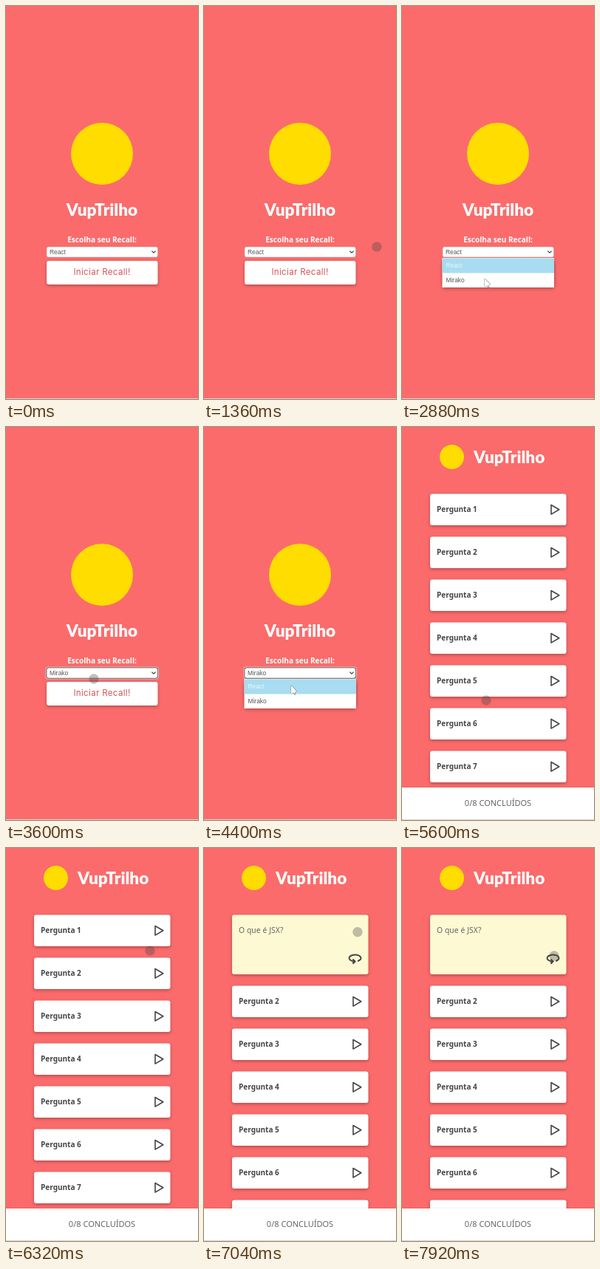
These frames come from a looping animation (260 by 532 pixels, 8000 ms). An HTML page with a canvas:

```html
<!DOCTYPE html>
<html lang="pt-BR">
<head>
<meta charset="utf-8">
<title>VupTrilho</title>
<style>
html, body { margin: 0; width: 100%; height: 100%; overflow: hidden; background: #fb6b6b; }
canvas { display: block; width: 260px; height: 532px; }
</style>
</head>
<body>
<canvas id="stage"></canvas>
<script>
const W = 260, H = 532, LOOP = 8000, STEP = 80;
const RED = '#fb6b6b', INK = '#444', YELLOW = '#ffdd00';
const SANS = '"Noto Sans", sans-serif';
const SMALL = '8.4px "Liberation Sans", sans-serif';
const TITLE = '900 22.6px Lato, sans-serif';
const OPTIONS = ['React', 'Mirako'];

// moments of the session, in ms
const TOUCH = 1360, OPEN = 2240, PICK = 3360, REOPEN = 4080, REPICK = 4640, BEGIN = 5600, FLIP = 6960;

// pointer glides: start, duration, destination
const glides = [
  { at: TOUCH, time: 560, x: 106, y: 357 },
  { at: 1920, time: 240, x: 112, y: 341 },
  { at: OPEN, time: 640, x: 112, y: 369 },
  { at: PICK, time: 240, x: 119, y: 341 },
  { at: REOPEN, time: 400, x: 118, y: 351 },
  { at: REPICK, time: 400, x: 114, y: 370 },
  { at: BEGIN, time: 720, x: 195, y: 139 },
  { at: 6480, time: 320, x: 208, y: 113 },
  { at: FLIP, time: 960, x: 206, y: 146 }
];

const canvas = document.getElementById('stage');
const ctx = canvas.getContext('2d');
const dpr = window.devicePixelRatio || 1;
canvas.width = W * dpr;
canvas.height = H * dpr;

const ease = k => k * k * (3 - 2 * k);
const within = (t, from, to) => t >= from && t < to;

function pointer(t) {
  let x = 234, y = 326;
  for (const g of glides) {
    const k = ease(Math.min(1, Math.max(0, (t - g.at) / g.time)));
    x += (g.x - x) * k;
    y += (g.y - y) * k;
  }
  return [x, y];
}

function text(str, x, y, font, color, align = 'left', spacing = 0) {
  ctx.font = font;
  ctx.fillStyle = color;
  ctx.textAlign = align;
  ctx.letterSpacing = spacing + 'px';
  ctx.fillText(str, x, y);
}

function box(x, y, w, h, r, fill, shadow = 0) {
  ctx.save();
  if (shadow) {
    ctx.shadowColor = 'rgba(0,0,0,.3)';
    ctx.shadowBlur = shadow * dpr;
    ctx.shadowOffsetY = 1.5 * dpr;
  }
  ctx.fillStyle = fill;
  ctx.beginPath();
  ctx.roundRect(x, y, w, h, r);
  ctx.fill();
  ctx.restore();
}

function dot(x, y, r, fill) {
  ctx.fillStyle = fill;
  ctx.beginPath();
  ctx.arc(x, y, r, 0, Math.PI * 2);
  ctx.fill();
}

function line(points, color, width, closed) {
  ctx.strokeStyle = color;
  ctx.lineWidth = width;
  ctx.lineJoin = ctx.lineCap = 'round';
  ctx.beginPath();
  points.forEach(p => ctx.lineTo(...p));
  if (closed) ctx.closePath();
  ctx.stroke();
}

function arrow(x, y) {
  line([[x + 3, y + 7], [x + 5, y + 11.5]], '#888', 2.4);
  line([[x, y], [x, y + 11], [x + 7.2, y + 8]], '#888', 1, true);
  ctx.fillStyle = '#fff';
  ctx.fill();
  line([[x + 3, y + 7], [x + 4.8, y + 11]], '#fff', 1);
}

function popup(hover) {
  box(54.5, 341, 151.5, 40, 0, '#fff', 5);
  ctx.fillStyle = '#a8dcf0';
  ctx.fillRect(54.5, 341.5 + hover * 20, 151.5, 20);
  OPTIONS.forEach((name, i) =>
    text(name, 59.5, 354.2 + i * 20, SMALL, i === hover ? '#e8f6fb' : '#555'));
}

function home(t, open) {
  dot(130, 200, 42, YELLOW);
  text('VupTrilho', 130, 284, TITLE, '#fff', 'center');
  text('Escolha seu Recall:', 130, 320.3, '600 10.1px ' + SANS, '#fff', 'center');

  const focus = t >= PICK;
  if (focus) box(53.5, 324.5, 153.5, 17, 4, '#e6c4c4');
  box(54.5, 325.5, 151.5, 15, 3, focus ? '#444' : '#d09090');
  box(55.3, 326.3, 149.9, 13.4, 2.5, '#fff');
  text(OPTIONS[+within(t, PICK, REPICK)], 59, 336, SMALL, '#555');
  line([[197.8, 332], [200, 334.2], [202.2, 332]], INK, 1.2);

  box(55, 345, 150.5, 32, 3, '#fff', 4);
  text('Iniciar Recall!', 130, 364.3, '11.5px Inter, sans-serif', '#d4545a', 'center', 0.35);

  if (open) popup(+(within(t, 2960, PICK) || within(t, REOPEN, 4320)));
}

function turnIcon(x, y) {
  ctx.strokeStyle = INK;
  ctx.lineWidth = 2;
  ctx.lineCap = 'round';
  ctx.beginPath();
  ctx.ellipse(x, y, 8, 4.5, 0, 2.1, Math.PI * 2 + 1);
  ctx.stroke();
  line([[x - 2.5, y + 1.8], [x + 0.5, y + 4.5], [x - 2.5, y + 7.4]], INK, 1.6, true);
  ctx.fillStyle = INK;
  ctx.fill();
}

function card(n, y) {
  box(38, y, 184.5, 42.5, 3, '#fff', 4);
  text('Pergunta ' + n, 47, y + 24.7, '600 10px ' + SANS, INK);
  line([[202, y + 15], [202, y + 27.6], [212.8, y + 21.3]], INK, 1.6, true);
}

function quiz(flipped) {
  dot(67.5, 40.5, 16.5, YELLOW);
  text('VupTrilho', 97, 48.5, TITLE, '#fff');

  const top = 90.5;
  if (flipped) {
    box(38, top, 184.5, 80.5, 3, '#fdf9d3', 4);
    text('O que é JSX?', 47, top + 24, '10.3px ' + SANS, '#666', 'left', 0.1);
  } else card(1, top);
  for (let i = 1; i < 8; i++) card(i + 1, top + i * 58 + (flipped ? 38 : 0));

  box(0, 488, W, 44, 0, '#fff', 5);
  text('0/8 CONCLUÍDOS', 130, 513, '11px ' + SANS, '#666', 'center');
}

function draw(t) {
  ctx.setTransform(dpr, 0, 0, dpr, 0, 0);
  ctx.fillStyle = RED;
  ctx.fillRect(0, 0, W, H);

  const open = within(t, OPEN, PICK) || within(t, REOPEN, REPICK);
  const flipped = t >= FLIP;
  if (t < BEGIN) home(t, open);
  else quiz(flipped);

  ctx.fillStyle = '#d8d4d4';
  ctx.fillRect(0, 531, W, 1);

  if (t >= TOUCH) {
    const [x, y] = pointer(t);
    if (open) arrow(x, y);
    else dot(x, y, 6.7, 'rgba(70,70,70,.34)');
  }
  if (flipped) turnIcon(204.5, 149);
}

const start = performance.now();
function tick() {
  const t = (performance.now() - start) % LOOP;
  draw(Math.floor(t / STEP) * STEP);
  requestAnimationFrame(tick);
}
tick();
</script>
</body>
</html>
```
